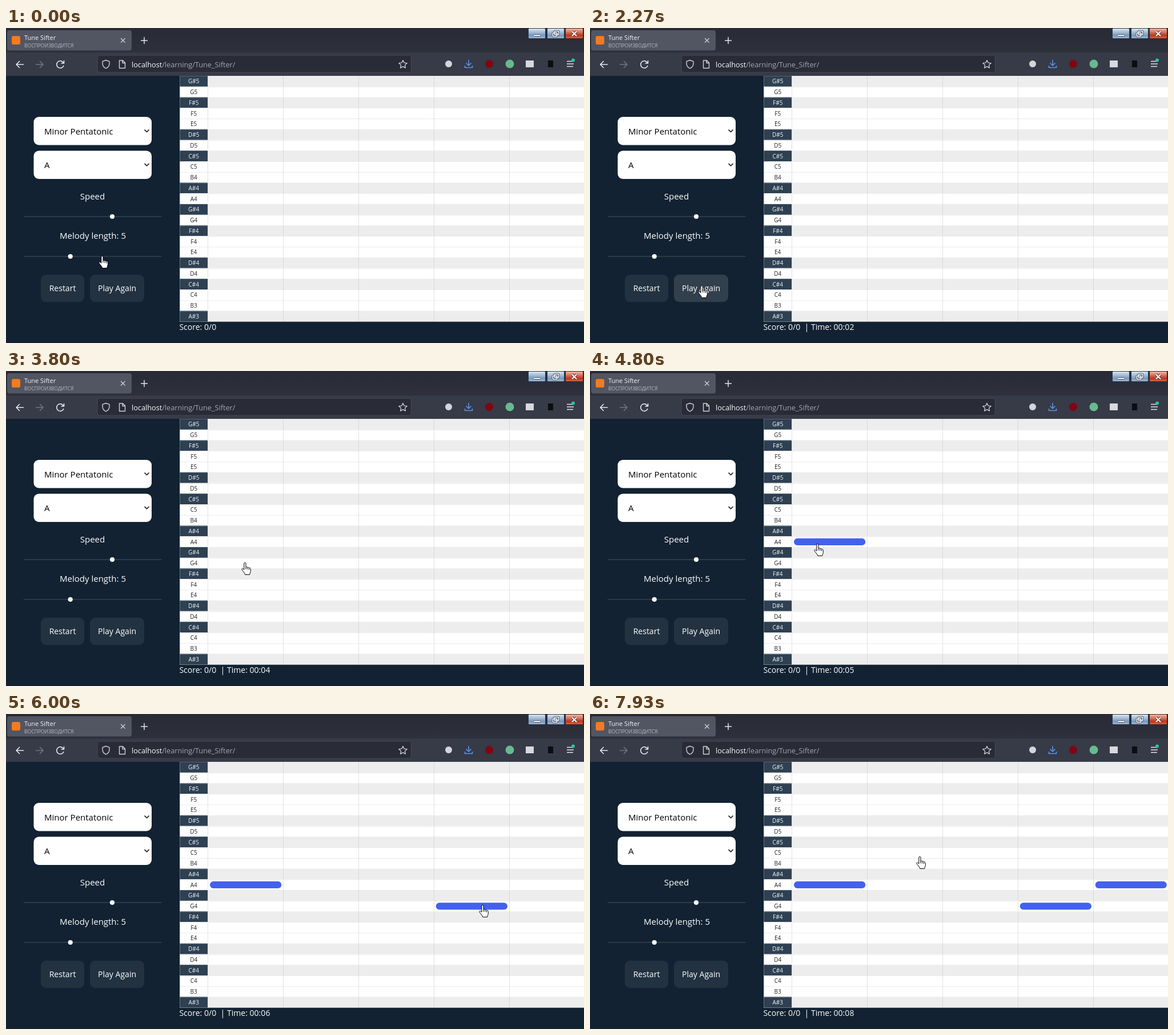
An HTML page with a canvas for the animation above (8 s loop, 1012 by 553 pixels).

```html
<!DOCTYPE html>
<html lang="en">
<head>
<meta charset="utf-8">
<title>Tune Sifter</title>
<style>
html, body { margin: 0; width: 100%; height: 100%; overflow: hidden; background: #122232; }
#stage { position: relative; width: 1012px; height: 553px; overflow: hidden; }
canvas { position: absolute; left: 0; top: 0; }
span { position: absolute; white-space: pre; height: 20px; line-height: 20px; font-family: "Open Sans", "Noto Sans", sans-serif; }
i { font-style: normal; color: #fbfbfe; }
</style>
</head>
<body>
<div id="stage"><canvas id="base" width="1012" height="553"></canvas></div>
<script>
const W = 1012, H = 553, LOOP = 8000, FPS = 15;
const stage = document.getElementById('stage');
const c = document.getElementById('base').getContext('2d');
const PANEL = '#122232', BLUE = '#4361ee';
const TOP = 84, ROW = 18.75, GRID = 353.5, COL = 131.9;
const PITCHES = ['C', 'C#', 'D', 'D#', 'E', 'F', 'F#', 'G', 'G#', 'A', 'A#', 'B'];
const keys = Array.from({ length: 23 }, (_, i) => {
  const n = 68 - i;
  return PITCHES[n % 12] + Math.floor(n / 12);
});

// Cursor moves: first step, last step, x, y
const START = [168, 400];
const MOVES = [
  [1, 1, 151, 400], [5, 5, 150, 400], [19, 19, 149, 400], [25, 25, 148, 400],
  [26, 34, 195, 452], [44, 46, 330, 447], [47, 48, 471, 423],
  [52, 60, 399, 305], [70, 72, 398, 303], [74, 82, 836, 342],
  [88, 90, 834, 335], [91, 94, 915, 303], [98, 99, 915, 299],
  [104, 104, 916, 299], [109, 109, 916, 304], [112, 119, 577, 250]
];
// Notes: step, column, row
const NOTES = [[59, 0, 11], [81, 3, 13], [94, 4, 11]];
const TICKS = [8, 22, 37, 52, 67, 83, 98, 113];

function label(text, x, y, size, color, align = 'left') {
  const el = document.createElement('span');
  el.textContent = text;
  el.style.cssText = `top:${y - 10}px;font-size:${size}px;color:${color};text-align:${align};`;
  if (align === 'center') {
    el.style.left = x - 100 + 'px';
    el.style.width = '200px';
  } else el.style.left = x + 'px';
  stage.append(el);
  return el;
}

function box(x, y, w, h, r, fill, edge) {
  c.beginPath();
  c.roundRect(x, y, w, h, r);
  c.fillStyle = fill;
  c.fill();
  if (edge) { c.strokeStyle = edge; c.lineWidth = 1; c.stroke(); }
}

function disc(x, y, r, fill) {
  c.beginPath();
  c.arc(x, y, r, 0, 7);
  c.fillStyle = fill;
  c.fill();
}

function stroke(d, color, width = 1.5, dash = []) {
  c.strokeStyle = color;
  c.lineWidth = width;
  c.setLineDash(dash);
  c.stroke(new Path2D(d));
  c.setLineDash([]);
}

function fade(y0, y1, ...colors) {
  const g = c.createLinearGradient(0, y0, 0, y1);
  colors.forEach((col, i) => g.addColorStop(i / (colors.length - 1), col));
  return g;
}

function drawBrowser() {
  const light = '#e6e6ec';
  box(0, 0, W, 43, 0, fade(0, 43, '#282a36', '#2e303c'));
  box(0, 43, W, 41, 0, '#373a47');
  box(2, 4, 218, 35.5, 4, '#525562');
  box(10, 14, 15, 15, 3, '#f87a1c');
  stroke('M201 18l7.5 7.5m0-7.5l-7.5 7.5', '#d4d5da', 1.2);
  stroke('M236 22h12m-6-6v12', light);

  const glass = fade(1, 19, '#d8e4f1', '#aabfd8', '#7897ba', '#a4bfdc');
  box(914.5, .5, 30, 18, 2, glass, '#27364b');
  box(947.5, .5, 30, 18, 2, glass, '#27364b');
  box(979.5, .5, 31, 18, 2, fade(1, 19, '#edb9a9', '#d67863', '#b9361e', '#d9734d'), '#4d2020');
  box(923.5, 11.5, 12, 3, 1, '#fff', '#46566c');
  c.lineJoin = 'round';
  for (const [col, w] of [['#46566c', 4], ['#fff', 2]])
    stroke('M960.5 5.5h7v6h-7zM957.5 8.5h7v6h-7z', col, w - .5);
  stroke('M991 6l8 8m0-8l-8 8', '#693231', 4.2);
  stroke('M991 6l8 8m0-8l-8 8', '#fff', 2.2);

  stroke('M31 64H18m6-6l-6 6 6 6', light, 1.6);
  stroke('M52 64h13m-6-6l6 6-6 6', '#747681', 1.5);
  stroke('M100.5 61A6.3 6.3 0 1 0 101 66M101.5 57v5h-5', light, 1.6);
  box(160, 48, 549.5, 30, 4, '#292b37', '#464955');
  stroke('M175 56.5l6 2.2v4c0 4-2.5 6.5-6 8.3-3.500-1.800-6-4.300-6-8.300v-4z', '#d0d1d7', 1.4);
  stroke('M198.500 57h6l4 4v9.500h-10zM204 57v4.500h4', '#d0d1d7', 1.4);

  c.beginPath();
  for (let i = 0; i < 10; i++) {
    const a = i * Math.PI / 5 - Math.PI / 2, r = i % 2 ? 3.6 : 7.5;
    c.lineTo(695 + r * Math.cos(a), 64 + r * Math.sin(a));
  }
  c.closePath();
  c.strokeStyle = '#d0d1d7';
  c.lineWidth = 1.3;
  c.stroke();

  disc(775, 63, 6, '#d4d5da');
  stroke('M810 56v10m-4.500-4.500l4.500 4.500 4.500-4.500M803.500 66v3.500h13v-3.500', '#5c93ec', 1.6);
  disc(846, 63, 7, '#800610');
  disc(882, 63, 7.5, '#68b990');
  box(910, 57, 14, 12, 0, '#d8d8df');
  box(949, 57, 9, 12, 0, '#0c0d12');
  stroke('M982 58.500h12m-12 4.500h12m-12 4.500h11', light, 1.4);
  disc(993, 56.5, 3, '#2ac3a2');
}

function drawPanel(hover) {
  for (const y of [156, 215.5]) {
    box(48.5, y, 206.5, 49.5, 9, '#fff');
    stroke(`M242.500 ${y + 22.5}l4 4 4-4`, '#111', 1.6);
  }
  for (const [y, x] of [[331, 186], [401, 112.7]]) {
    box(30.5, y - 1, 242, 2, 1, '#2c3a48');
    disc(x, y, 4.1, '#fff');
  }
  box(61, 433, 76, 48, 9, '#223241');
  box(147, 433, 95, 48, 9, '#223241');
  if (hover) box(147, 433, 95, 48, 9, `rgba(255,255,255,${.07 * hover})`);
}

function drawGrid() {
  box(304, TOP, W - 304, 431.5, 0, '#fff');
  keys.forEach((key, i) => {
    const y = TOP + i * ROW, sharp = key.includes('#');
    if (sharp) {
      box(353, y, W - 353, ROW, 0, '#ededed');
      box(304, y, 49, ROW, 0, '#2e4052');
      stroke(`M304 ${Math.round(y) + .5}H353`, '#71808d', 1, [1, 1]);
    } else stroke(`M304 ${Math.round(y) + .5}H${W}`, '#ebebeb', 1);
  });
  stroke('M304.500 84V515.500', '#9ba3aa', 1, [1, 1]);
  for (let i = 0; i < 5; i++)
    stroke(`M${Math.round(GRID + i * COL - .5) + .5} 84V515.500`, '#c6c6c6', 1, [1, 1]);
}

function cursorAt(k) {
  let [x, y] = START;
  for (const [a, b, tx, ty] of MOVES) {
    if (k < a) break;
    const n = b - a + 1;
    let p = Math.min(1, (k - a + 1) / n);
    if (n > 4) p = p * p * (3 - 2 * p);
    x += (tx - x) * p;
    y += (ty - y) * p;
  }
  return [Math.round(x), Math.round(y)];
}

label('Tune Sifter', 32, 16.5, 11, '#f4f4f8');
label('ВОСПРОИЗВОДИТСЯ', 32, 30.5, 8.5, '#b8bac2');
label('', 220, 64, 12.7, '#a4a6b0').innerHTML = '<i>localhost</i>/learning/Tune_Sifter/';
label('Minor Pentatonic', 67, 181, 15, '#000');
label('A', 67, 240, 15, '#000');
label('Speed', 151.5, 294.5, 15, '#fff', 'center');
label('Melody length: 5', 152, 363.5, 15, '#fff', 'center');
label('Restart', 99, 457, 14.06, '#fff', 'center');
label('Play Again', 194.5, 457, 14.06, '#fff', 'center');
keys.forEach((key, i) => label(key, 328.7, TOP + (i + .5) * ROW, 10, key.includes('#') ? '#f2f4f6' : '#222', 'center'));
label('Score: 0/0', 303.4, 525, 14.06, '#fff');
const clock = label('', 375.5, 525, 14.06, '#fff');

// The pointer has its own layer above the text
const top2d = stage.appendChild(Object.assign(document.createElement('canvas'), { width: W, height: H })).getContext('2d');
const ARROW = new Path2D('M.5.5V16.500l3.700-3.500 2.600 6 2.500-1-2.600-6H11.500z');
const HAND = new Path2D('M4.800 13V2a1.600 1.600 0 0 1 3.200 0v6.500c1-1 2.800-.6 2.900.6 1-.8 2.600-.4 2.700.8 1.200-.5 2.700.1 2.700 1.600v4c0 2-1.300 3-1.600 6H6.700C6.300 18.500 2.500 15.500 1 12.600c-.6-1.600 1.200-2.500 2.300-1.400z');
const FINGERS = new Path2D('M8 8.500v3.500M10.900 9.500v3M13.600 10.500v2.500');

const inButton = ([x, y]) => x >= 147 && x <= 242 && y >= 433 && y <= 481;

function drawCursor(pos) {
  const [x, y] = pos;
  const hand = x > GRID || inButton(pos) || (x < 273 && y < 412);
  top2d.clearRect(0, 0, W, H);
  top2d.save();
  top2d.translate(x - (hand ? 6 : 0), y);
  top2d.fillStyle = '#fff';
  top2d.strokeStyle = '#000';
  top2d.lineWidth = 1;
  top2d.lineJoin = 'round';
  const shape = hand ? HAND : ARROW;
  top2d.fill(shape);
  top2d.stroke(shape);
  if (hand) top2d.stroke(FINGERS);
  top2d.restore();
}

let last = -1;
function render(now) {
  requestAnimationFrame(render);
  const k = Math.floor((now % LOOP + 4) * FPS / 1000) % (LOOP * FPS / 1000);
  if (k === last) return;
  last = k;
  const pos = cursorAt(k);
  box(0, 0, W, H, 0, PANEL);
  drawBrowser();
  drawPanel(inButton(pos) ? 1 : 0);
  drawGrid();
  for (const [at, col, row] of NOTES)
    if (k >= at) box(357 + col * COL, TOP + row * ROW + 3.6, 125.3, 12.2, 6.1, BLUE);
  const secs = TICKS.filter(s => k >= s).length;
  clock.textContent = secs ? '| Time: 00:0' + secs : '';
  drawCursor(pos);
}
render(performance.now());
</script>
</body>
</html>
```
